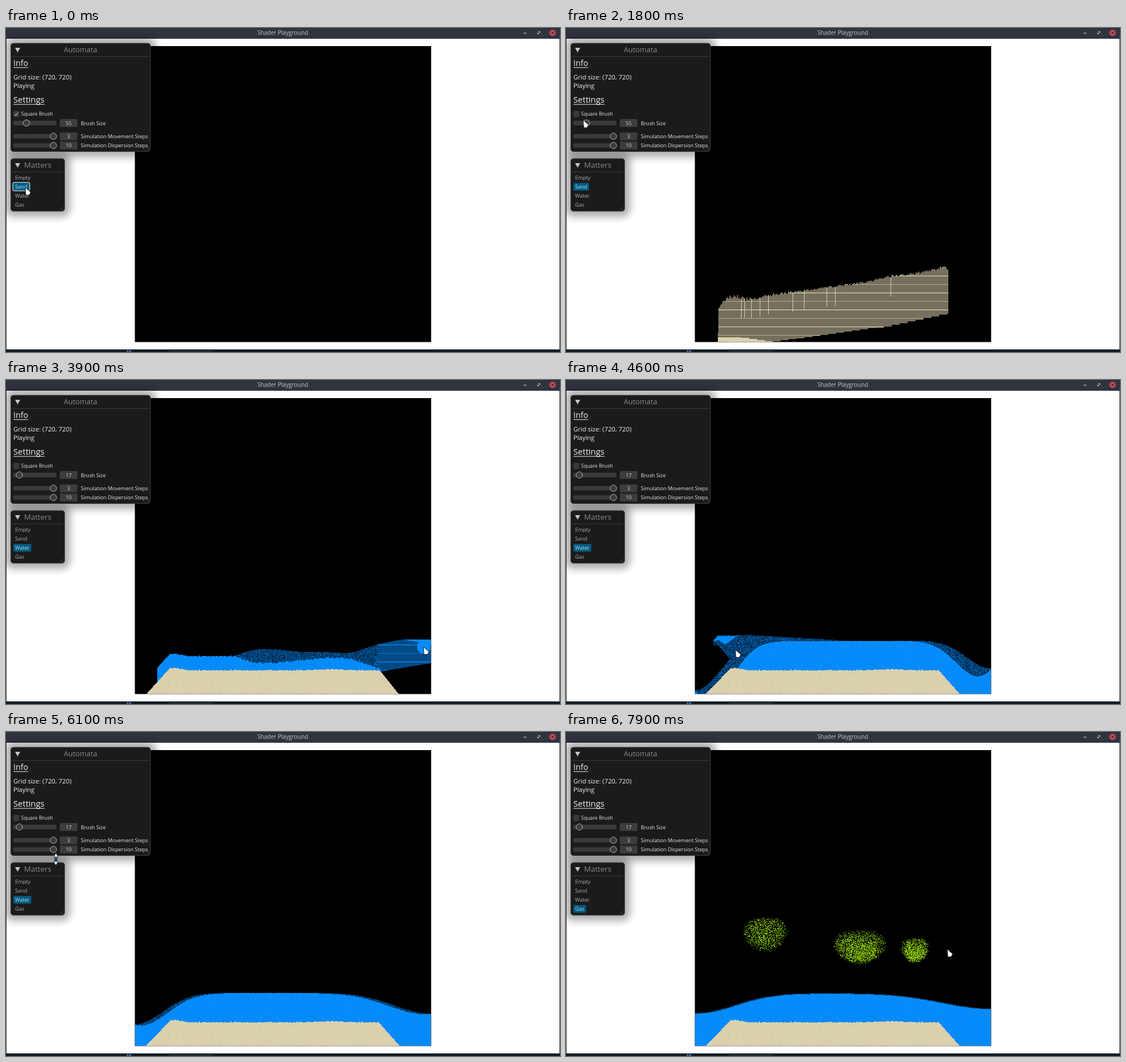
Animation, 978 px wide and 573 px high, one loop 8000 ms. Source, as an HTML page with a canvas:

```html
<!DOCTYPE html>
<html lang="en">
<head>
<meta charset="utf-8">
<title>Shader Playground</title>
<style>
html, body { margin: 0; width: 100%; height: 100%; overflow: hidden; background: #fff }
canvas { display: block }
</style>
</head>
<body>
<canvas id="stage" width="978" height="573"></canvas>
<script>
const ctx = document.getElementById('stage').getContext('2d');
const LEFT = 228, RIGHT = 750, TOP = 33, FLOOR = 555, SIZE = 522, SPEED = 130;
const SAND = [221, 211, 175], WATER = [6, 141, 255], GAS = [170, 245, 10];
const SOLID = 0, STRIPES = 1, DITHER = 2;
const grid = ctx.createImageData(SIZE, SIZE);

const mix = (a, b, k) => a + (b - a) * k;
const clamp = k => Math.max(0, Math.min(1, k));
const bell = (d, width) => Math.exp(-((d / width) ** 2));

function hash(x, y) {
  let n = Math.imul(x, 374761393) ^ Math.imul(y, 668265263);
  n = Math.imul(n ^ n >>> 13, 1274126177);
  return ((n ^ n >>> 16) >>> 0) / 4294967296;
}

// Rows are [time, ...values]; returns the values interpolated at t.
function track(rows, t) {
  let i = 0;
  while (i < rows.length - 2 && t > rows[i + 1][0]) i++;
  const a = rows[i], b = rows[i + 1], k = clamp((t - a[0]) / (b[0] - a[0]));
  return a.slice(1).map((n, j) => mix(n, b[j + 1], k));
}

// time, x, y
const POINTER = [
  [0, 34, 282], [.52, 290, 377], [.89, 655, 370], [1, 679, 366], [1.6, 19, 152],
  [1.9, 36, 168], [2.3, 23.5, 168], [2.7, 34, 290], [2.8, 34, 290], [3.1, 288, 470],
  [3.9, 737, 472], [4.45, 276, 463], [4.6, 299, 477], [5, 330, 545], [6.1, 88, 225],
  [6.7, 24, 312], [7.4, 352, 397], [7.6, 518, 399], [7.75, 616, 396], [7.9, 673, 384]
];
// time, level, then drop and reach at the left and right wall, spray depth
const SURFACE = [
  [4.6, 460.5, 88, 62, 50, 60, 35],
  [6.1, 461, 56, 68, 37, 92, 10],
  [7.9, 462, 35, 96, 27, 120, 4]
];
// birth, x, y, radius
const PUFFS = [[7.45, 352, 397, 11], [7.61, 518, 399, 28], [7.74, 616, 396, 15]];
const SEAMS = [309, 315, 327, 342, 357, 400, 420, 460, 475, 573];

function put(x, y, rgb, k) {
  if (x < LEFT || y < TOP || x >= RIGHT || y >= FLOOR) return;
  const i = ((y - TOP) * SIZE + x - LEFT) * 4;
  for (let c = 0; c < 3; c++) grid.data[i + c] = rgb[c] * k;
}

function shade(x, y, mode, band) {
  const h = hash(x, y);
  if (mode === SOLID) return .95 + .07 * h;
  if (mode === DITHER) return .12 + .68 * h;
  if ((y + (y < 400 ? band % 2 * 7 : 0)) % 15 === 3) return .95;
  return y % 2 ? .66 : .4;
}

function fill(x, from, to, rgb, mode, band = 0) {
  for (let y = Math.round(from); y < Math.round(to); y++) put(x, y, rgb, shade(x, y, mode, band));
}

// A falling block thins to half density from below, then piles up again.
function fall(d, base, depth, floor) {
  if (d <= 0) return null;
  const bottom = Math.min(floor, base + d);
  const pile = floor - Math.min(depth, Math.max(0, base + d - floor));
  const top = d < depth ? base - depth : base - 2 * depth + d;
  return { top: Math.min(top, pile), edge: base - d, bottom, pile, floor };
}

function fillColumn(x, s, rgb, mode, band) {
  const split = Math.max(s.top, s.edge);
  fill(x, s.top, Math.min(split, s.bottom), rgb, SOLID);
  fill(x, split, Math.min(s.bottom, s.pile), rgb, mode, band);
  fill(x, s.pile, s.floor, rgb, SOLID);
}

// Settled sand: a rough flat top whose steep sides slump with time.
function ground(x, t) {
  const slump = .02 + 1 - (1 - clamp((t - 1.8) / 2.8)) ** 1.7;
  const side = Math.min((x - 268 + 22 * slump) / 45, (675 + 19 * slump - x) / 40) / slump;
  const top = 513.2 - 4 * bell(x - 297, 15) - 1.8 * bell(x - 570, 30) + 1.6 * hash(x >> 1, 7) - .8;
  return Math.min(FLOOR, Math.max(top, FLOOR - 46 * side));
}

function sandColumn(x, t, floor) {
  const inside = x >= 268 && x < 675;
  if (t >= 2.5 || !inside && t > (x < 300 ? 2 : 2.4)) return fill(x, floor, FLOOR, SAND, SOLID);
  if (!inside) return;
  const stamp = Math.max(310, Math.ceil(x / 14) * 14);
  const born = .52 + (stamp - 310) * .00104;
  const base = 397 - 7.5 * clamp((stamp - 573) / 100);
  const corner = Math.max(0, 285 - x) ** 2 / 32 + Math.max(0, x - 670);
  const depth = FLOOR - floor - corner - 2.5 * hash(x >> 1, 3) * (x < 345);
  const s = fall(SPEED * (t - born), base, depth, FLOOR);
  if (!s) return;
  fillColumn(x, s, SAND, STRIPES, SEAMS.filter(n => n < x).length);
  if (SEAMS.includes(x)) fill(x, Math.max(s.top, s.edge), Math.min(s.bottom, s.top + 34), SAND, SOLID);
  for (let y = Math.round(s.top); y < s.edge; y++)
    if (x < 625 && (x + (y >> 1)) % 20 === 0) put(x, y, SAND, .3);
}

// The first stroke of water, poured from left to right.
function poured(x, t, floor) {
  if (x < 267) return { top: floor, edge: 0, bottom: floor, pile: floor, floor };
  const born = 3.05 + .72 * Math.max(0, (x - 280) / 470) ** .8;
  const base = 484 - 28 * bell(x - 435, 80) + 8 * bell(x - 610, 35);
  return fall(SPEED * (t - born), base, 25, floor);
}

function flowing(x, t, floor) {
  const [level, dropL, reachL, dropR, reachR, spray] = track(SURFACE, t);
  const l = dropL * bell(x - LEFT, reachL), r = dropR * bell(RIGHT - x, reachR);
  const slope = 2 * l * (x - LEFT) / reachL ** 2 + 2 * r * (RIGHT - x) / reachR ** 2;
  const top = Math.min(floor, level + l + r);
  return { top, edge: 0, bottom: floor, pile: Math.min(floor, top + 1 + spray * slope), floor };
}

function waterColumn(x, t, floor) {
  if (t < 3.1) return;
  let s = t < 4.6 ? poured(x, t, floor) : flowing(x, t, floor);
  if (!s) return;
  const again = x < 288 ? 3.9 : mix(4.5, 3.95, (x - 262) / 488);
  if (t < 4.6 && t > again) {
    const k = (t - again) / (4.6 - again), goal = flowing(x, t, floor);
    const start = x < 288 ? s.top : goal.top - 10;
    s = {
      top: mix(start, goal.top, k), edge: 0, floor,
      bottom: mix(s.bottom, floor, k), pile: mix(s.pile, goal.pile, k)
    };
  }
  fillColumn(x, s, WATER, t < 4 && x > 655 ? STRIPES : DITHER);

  // the overhanging end of the second stroke and its tail
  if (t >= 4.45 && t < 5 && x >= 260 && x < 480) {
    const drop = SPEED * Math.max(0, t - 4.6);
    const top = 451 + Math.max(0, 268 - x) + Math.max(0, (x - 320) / 18) + drop;
    const low = Math.min(s.pile, 469 + Math.max(0, x - 268) * 1.15 + drop);
    fill(x, top, low, WATER, DITHER);
    fill(x, top + 2, Math.min(low, top + 17 - Math.abs(x - 280) * .7), WATER, SOLID);
  }
}

function disc(cx, cy, r) {
  for (let x = Math.round(cx - r); x <= cx + r; x++) {
    const h = Math.sqrt(Math.max(0, r * r - (x - cx) ** 2));
    fill(x, cy - h, cy + h, WATER, SOLID);
  }
}

// Gas rises from the top first and spreads sideways as it thins.
function puff([born, cx, y0, radius], t) {
  const age = t - born;
  if (age < 0) return;
  const top = y0 - 12 - SPEED * age, bottom = y0 + 12 - SPEED * Math.max(0, age - .3);
  const cy = (top + bottom) / 2, ry = (bottom - top) / 2, rx = radius + 65 * age;
  const density = 1 - 1.25 * age;
  for (let y = Math.round(top); y <= bottom; y++) {
    const v = (y - cy) / ry;
    for (let x = Math.round(cx - rx); x <= cx + rx; x++) {
      const u = (x - cx) / rx / (1 - .18 * Math.max(0, v));
      const r = u * u + (v < 0 ? v ** 4 : v * v);
      const p = density * (1 - r * r) * (1 + .5 * v * (density > .5));
      if (r < 1 && hash(x, y) < p) put(x, y, GAS, .5 + .5 * hash(y, x));
    }
  }
}

function drawGrid(t, px, py) {
  grid.data.fill(0);
  for (let i = 3; i < grid.data.length; i += 4) grid.data[i] = 255;
  for (let x = LEFT; x < RIGHT; x++) {
    const floor = ground(x, t);
    waterColumn(x, t, floor);
    sandColumn(x, t, floor);
  }
  if (t >= 3.1 && t < 4.5) disc(px, py, 12);
  PUFFS.forEach(p => puff(p, t));
  rect(227.5, 32, 523, 523.4, '#000');
  ctx.putImageData(grid, LEFT, TOP);
}

function rect(x, y, w, h, color) {
  ctx.fillStyle = color;
  ctx.fillRect(x, y, w, h);
}

function paint(color, border) {
  ctx.fillStyle = color;
  ctx.fill();
  if (border) { ctx.strokeStyle = border; ctx.stroke(); }
}

function round(x, y, w, h, r, color, border) {
  ctx.beginPath();
  ctx.roundRect(x, y, w, h, r);
  paint(color, border);
}

function circle(x, y, r, color, border) {
  ctx.beginPath();
  ctx.arc(x, y, r, 0, 7);
  paint(color, border);
}

function path(p) {
  ctx.beginPath();
  for (let i = 0; i < p.length; i += 2) ctx.lineTo(p[i], p[i + 1]);
}

function shape(color, border, ...p) {
  path(p);
  ctx.closePath();
  paint(color, border);
}

function line(color, width, ...p) {
  path(p);
  ctx.strokeStyle = color;
  ctx.lineWidth = width;
  ctx.stroke();
  ctx.lineWidth = 1;
}

function text(s, x, y, size, color, align = 'left') {
  ctx.font = `${size}px "Open Sans", "Noto Sans", sans-serif`;
  ctx.textAlign = align;
  ctx.fillStyle = color;
  ctx.fillText(s, x, y);
  return ctx.measureText(s).width;
}

function heading(s, y, size) {
  const w = text(s, 13, y, size, '#f4f4f4');
  rect(13, y + 2.5, w, 1, '#f4f4f4');
}

function drawWindow() {
  rect(0, 0, 978, 573, '#fff');
  rect(0, 0, 978, 19, '#2f343f');
  rect(0, 19, 1, 550, '#2f343f');
  rect(977, 19, 1, 550, '#2f343f');
  rect(0, 568.4, 978, 5, '#141a24');
  rect(288, 570, 77, 3, '#232a33');
  rect(213, 570, 3, 3, '#2f6d98');
  rect(217, 570, 4, 3, '#2f6d98');
  text('Shader Playground', 488.5, 12.3, 10.15, '#c3c7cf', 'center');
  rect(914, 8.5, 5, 1.3, '#c3c7cf');
  shape('#c3c7cf', null, 939.5, 6, 943, 6, 943, 9.5);
  shape('#c3c7cf', null, 938, 7.5, 938, 11, 941.5, 11);
  circle(965, 8.5, 5.5, '#d0484f');
  line('#2f343f', 1.2, 963, 6.5, 967, 10.5);
  line('#2f343f', 1.2, 967, 6.5, 963, 10.5);
}

function shadow(x, y, w, h) {
  ctx.save();
  ctx.shadowColor = 'rgba(0,0,0,.32)';
  ctx.shadowBlur = 14;
  round(x - 10, y - 10, w + 20, h + 20, 14, '#000');
  ctx.restore();
}

// Only the blurred outside of the shape is wanted, so it is cast from off stage.
function castShadow(x, y, w, h) {
  ctx.save();
  ctx.shadowColor = 'rgba(0,0,0,.32)';
  ctx.shadowBlur = 14;
  ctx.shadowOffsetX = 2000;
  round(x - 2010, y - 10, w + 20, h + 20, 14, '#000');
  ctx.restore();
}

function panel(title, x, y, w, h, titleX, size) {
  round(x, y, w, h, 4.5, '#1b1b1b', '#3c3c3c');
  rect(x, y + 23, w, 1, '#3c3c3c');
  shape('#c8c8c8', null, 16, y + 8, 25, y + 8, 20.5, y + 16);
  text(title, titleX, y + 16, size, '#8c8c8c');
  for (const n of [4, 8]) line('#4a4a4a', .8, x + w - n, y + h - 2, x + w - 2, y + h - n);
}

function slider(y, knob, value, label, hot) {
  round(13, y - 4, 76, 8, 1.5, hot ? '#464646' : '#3a3a3a');
  circle(knob, y, 5.6, hot ? '#555' : '#3c3c3c', hot ? '#fff' : '#b4b4b4');
  round(95, y - 7, 31, 14, 1.5, '#3c3c3c');
  text(value, 110.5, y + 3.5, 9.3, '#d0d0d0', 'center');
  text(label, 132, y + 3.5, 9.1, '#e6e6e6');
}

function drawPanels(t, px, py) {
  const automata = [8.5, 27, 246.5, 191.5], matters = [8.5, 231, 95, 93];
  castShadow(...automata);
  castShadow(...matters);

  panel('Automata', ...automata, 102, 12.8);
  heading('Info', 67, 14.2);
  text('Grid size: (720, 720)', 13, 91, 11.3, '#f0f0f0');
  text('Playing', 13, 106, 11.2, '#f0f0f0');
  heading('Settings', 132, 14.8);
  round(13, 147, 10.5, 10.5, 1.5, '#3a3a3a');
  if (t < 1.6) line('#c4c4c4', 1.2, 15.5, 152.5, 17.5, 155, 21, 149.5);
  text('Square Brush', 26.5, 155, 8.95, '#e6e6e6');
  const k = clamp((t - 1.9) / .4);
  slider(168, mix(36, 23.5, k), Math.round(mix(55, 17, k)), 'Brush Size', t > 1.85 && t < 2.4);
  slider(191.5, 83.7, 3, 'Simulation Movement Steps');
  slider(207.7, 83.7, 10, 'Simulation Dispersion Steps');

  panel('Matters', ...matters, 32, 13.3);
  const chosen = t < 2.8 ? 1 : t < 6.8 ? 2 : 3;
  ['Empty', 'Sand', 'Water', 'Gas'].forEach((name, i) => {
    const y = 265 + 16 * i, on = i === chosen;
    ctx.font = '9.2px "Open Sans", "Noto Sans", sans-serif';
    const w = ctx.measureText(name).width + 6;
    const hover = px > 12 && px < 14 + w && Math.abs(py - y + 2) < 8;
    if (hover) round(12, y - 8, w + 2.5, 15, 2, on ? '#005c80' : '#464646', on ? '#fff' : '#a0a0a0');
    else if (on) round(13, y - 7, w, 13.5, 1.5, '#005c80');
    text(name, 16, y + 3.3, 9.2, on ? '#c0deff' : hover ? '#f0f0f0' : '#b0b0b0');
  });
}

function drawPointer(x, y) {
  const resizing = x < 104 && y > 220 && y < 230;
  if (!resizing) return shape('#fff', '#222', x, y, x + 9.5, y + 8.5, x + 7, y + 13.5, x + 1, y + 13.5);
  rect(x - 2.5, y - 3, 5, 7, '#27425f');
  for (const d of [-1, 1]) shape('#fff', '#333', x, y + 11 * d, x + 4, y + 4 * d, x - 4, y + 4 * d);
}

let shown = -1;
function frame(now) {
  const step = Math.floor(now % 8000 / 100);
  if (step !== shown) {
    shown = step;
    const t = step / 10, [px, py] = track(POINTER, t);
    drawWindow();
    drawGrid(t, px, py);
    drawPanels(t, px, py);
    drawPointer(px, py);
  }
  requestAnimationFrame(frame);
}
requestAnimationFrame(frame);
</script>
</body>
</html>
```
